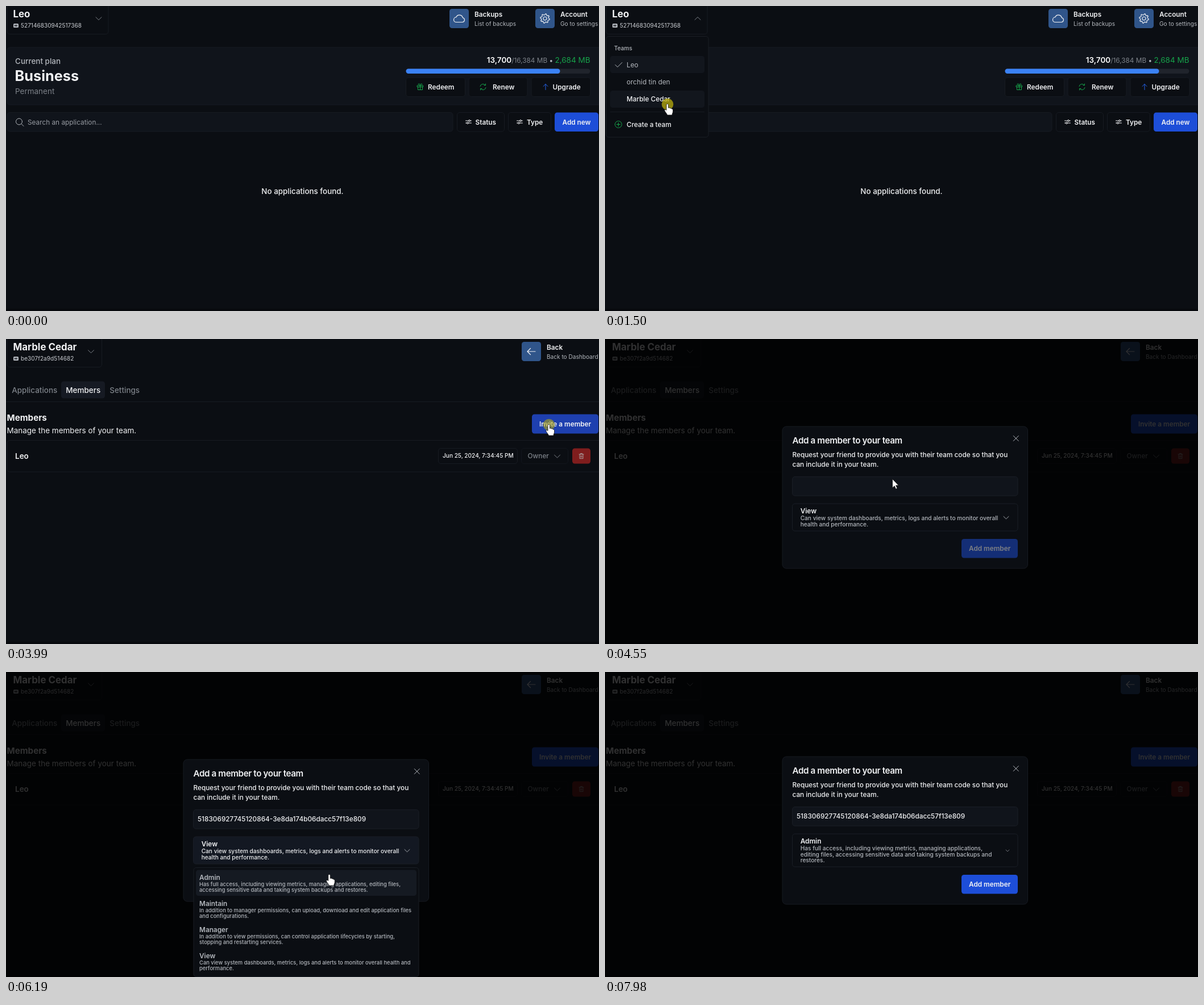
An HTML page for the animation above (8180 ms loop, 1043 px wide and 537 px high).

```html
<!DOCTYPE html>
<html lang="en">
<head>
<meta charset="utf-8">
<title>Inviting a team member</title>
<style>
  html, body { margin: 0; width: 100%; height: 100%; overflow: hidden; background: #0b0e13; }
  svg { display: block; font-family: Inter, "Liberation Sans", sans-serif; }
  text { white-space: pre; }
</style>
</head>
<body>
<svg id="stage" width="1043" height="537" viewBox="0 0 1043 537"></svg>
<script>
const LOOP = 8180;
const BG = '#0b0e13', CARD = '#10141b', LINE = '#171b22', BLUE = '#1d4ed8', TILE = '#30558a';
const WHITE = '#f1f2f4', SOFT = '#b4b8be', GREY = '#7d8289', GREEN = '#16a34a';
const USER = 'Leo', TEAM = 'Marble Cedar';
const CODE = '518306927745120864-3e8da174b06dacc57f13e809';

// Drawing helpers, all returning SVG markup
const text = (x, y, s, size = 11.8, weight = 400, fill = WHITE, more = '') =>
  `<text x="${x}" y="${y}" font-size="${size}" font-weight="${weight}" fill="${fill}" ${more}>${s}</text>`;
const rect = (x, y, w, h, fill = 'none', stroke = 'none', r = 4.5, more = '') =>
  `<rect x="${x}" y="${y}" width="${w}" height="${h}" rx="${r}" fill="${fill}" stroke="${stroke}" ${more}/>`;
const icon = (x, y, d, color = WHITE, scale = 1, more = '') =>
  `<path transform="translate(${x} ${y}) scale(${scale})" d="${d}" fill="none" stroke="${color}" stroke-linecap="round" stroke-linejoin="round" ${more}/>`;
const group = (id, ...parts) => `<g id="${id}">${parts.join('')}</g>`;
const rule = (x, y, w) => rect(x, y, w, 1, LINE, 'none', 0);

const gear = 'M' + Array.from({ length: 32 }, (_, i) => {
  const a = (i + .5) * Math.PI / 16, r = i % 4 < 2 ? 8.2 : 6.3;
  return (r * Math.cos(a)).toFixed(2) + ' ' + (r * Math.sin(a)).toFixed(2);
}).join('L') + 'zM3 0a3 3 0 1 1-6 0 3 3 0 0 1 6 0';
const icons = {
  gear,
  cloud: 'M-5 6.5h10.5a4 4 0 0 0 .8-7.9A6 6 0 0 0-5.2-2.3 4.4 4.4 0 0 0-5 6.5z',
  gift: 'M-5-2.5h10V0h-10zM-4 0v5h8V0M0-2.5V5M0-2.5c-4 0-4-3.5-2-3.2S0-2.5 0-2.5s0-2.9 2-3.2 2 3.2-2 3.2',
  renew: 'M-5-1a5 5 0 0 1 9-2M5 1a5 5 0 0 1-9 2M4.5-5.5V-3H2M-4.5 5.5V3H-2',
  up: 'M0 5V-5M-4-1L0-5 4-1',
  back: 'M7 0H-7M-1.5-5.5L-7 0l5.5 5.5',
  search: 'M3 3l4 4M4.5-1a5.5 5.5 0 1 1-11 0 5.5 5.5 0 0 1 11 0',
  sliders: 'M-5-2h5M3-2h2M-5 2h2M0 2h5M3-2a1.5 1.5 0 1 1-3 0 1.5 1.5 0 0 1 3 0M0 2a1.5 1.5 0 1 1-3 0 1.5 1.5 0 0 1 3 0',
  chevron: 'M-5-2.3L0 2.5 5-2.3',
  check: 'M-6 0l4 4 8-8',
  plus: 'M-6 0a6 6 0 1 0 12 0a6 6 0 1 0-12 0M-3 0h6M0-3v6',
  trash: 'M-4-3h8M-3-3v7.5h6V-3M-1.5-3v-1.5h3V-3M-1-.5v3M1-.5v3',
  close: 'M-4.5-4.5l9 9m0-9l-9 9'
};

const selector = (name, code, w, id) =>
  rect(2, -6, w, 55.5, 'none', LINE) +
  text(12.5, 20.3, name, 16.9, 700) +
  rect(13, 31, 9, 7, SOFT, 'none', 1.5) + icon(17.5, 34.5, 'M-2.5-1v2M-.5-1h2.5v2h-2.5z', BG, .9) +
  text(26, 38, code, 10.1, 400, '#c9ccd1') +
  icon(w - 17, 22, icons.chevron, GREY, 1, `id="${id}"`);

const tile = (x, d, title, note) =>
  rect(x, 5, 34, 34, TILE) + icon(x + 17, 22, icons[d], WHITE, 1, 'stroke-width="1.2"') +
  text(x + 44, 18.7, title, 11.8, 600) + text(x + 44, 34.8, note, 10.1, 400, SOFT);

const button = (x, y, w, d, color, label, gap = 38.5) =>
  rect(x, y, w, 33.5, BG, LINE) + icon(x + (gap > 34 ? 25 : 20), y + 16.5, icons[d], color) +
  text(x + gap, y + 21, label, 11.8, 600);

const tabs = active => [['Applications', 2, 95], ['Members', 97, 77], ['Settings', 174, 70]]
  .map(([s, x, w]) => (s === active ? rect(x, 74.5, w, 30, '#161a23') : '') +
    text(x + 8.2, 94.8, s, 13.5, 500, s === active ? WHITE : GREY)).join('');

const home = group('home',
  selector(USER, '527146830942517368', 178, 'homeChevron'),
  tile(780, 'cloud', 'Backups', 'List of backups'),
  tile(931, 'gear', 'Account', 'Go to settings'),
  rect(2, 73, 1046, 101, CARD, LINE),
  text(16, 102, 'Current plan', 13.5, 500, SOFT),
  text(15.5, 132.3, 'Business', 25.3, 700),
  text(16, 154.5, 'Permanent', 13.5, 400, GREY),
  `<text x="1027.5" y="99.8" text-anchor="end" font-size="11.8" fill="${GREY}"><tspan font-size="13.5" font-weight="600" fill="#fff">13,700</tspan>/16,384 MB<tspan fill="${SOFT}"> • </tspan><tspan font-size="13.5" fill="${GREEN}">2,684 MB</tspan></text>`,
  rect(703.5, 110.5, 324, 8.5, '#20242c', 'none', 4.2),
  rect(703.5, 110.5, 271, 8.5, '#3b82f6', 'none', 4.2),
  button(703.5, 126, 104, 'gift', GREEN, 'Redeem'),
  button(814, 126, 103, 'renew', GREEN, 'Renew', 42),
  button(924, 126, 104, 'up', '#2563eb', 'Upgrade', 37.5));

const apps = group('apps',
  rect(2, 187.5, 784, 33.5, CARD, LINE),
  icon(24, 204.5, icons.search, SOFT),
  text(38, 209.3, 'Search an application...', 11.8, 400, '#969aa1'),
  button(793.5, 187.5, 83, 'sliders', WHITE, 'Status', 32),
  button(883.5, 187.5, 75, 'sliders', WHITE, 'Type', 32.5),
  rect(965, 187.5, 77, 33.5, BLUE),
  text(978.5, 208.7, 'Add new', 11.8, 600),
  text(521.5, 331, 'No applications found.', 13.4, 500, WHITE, 'text-anchor="middle"'));

const teamMenu = group('teamMenu',
  rect(2, 53.5, 180, 177.5, BG, '#1a1e25'),
  text(16, 77.7, 'Teams', 10.1, 500, SOFT),
  rect(9, 88, 166, 30, '#12161d'),
  icon(24, 103.5, icons.check, SOFT),
  text(38, 107.5, USER, 11.8, 400, SOFT),
  text(38, 137.5, 'orchid tin den', 11.8, 400, SOFT),
  group('teamHover', rect(9, 149, 166, 30, '#12161d')),
  text(38, 168, TEAM, 11.8, 500),
  rule(9, 186, 166),
  icon(23.5, 208.5, icons.plus, GREEN),
  text(38, 213, 'Create a team', 11.8, 500));

const team = group('team',
  selector(TEAM, 'be307f2a9d514682', 166.5, 'teamChevron'),
  tile(907, 'back', 'Back', 'Back to Dashboard'),
  rule(0, 110, 1043),
  group('appTabs', tabs('Applications')),
  group('members', tabs('Members'),
    text(1.5, 144, 'Members', 15.2, 700),
    text(1.5, 166.3, 'Manage the members of your team.', 13.5, 400),
    rect(925, 132.5, 117, 34, BLUE, 'none', 4.5, 'id="invite"'),
    text(938, 153.8, 'Invite a member', 11.8, 600),
    rect(2, 178.5, 1046, 55.5, 'none', LINE),
    text(16, 211, USER, 13.5, 600),
    rect(760.5, 192.5, 139, 27, 'none', LINE),
    text(768, 209.3, 'Jun 25, 2024, 7:34:45 PM', 10.1, 500),
    rect(906.5, 192.5, 82, 27, 'none', '#12161d'),
    text(917.5, 210.3, 'Owner', 11.8, 500, GREY),
    icon(969.5, 206.5, icons.chevron, GREY),
    rect(996, 192.5, 32, 27, '#7f1d1d'),
    icon(1012, 206, icons.trash, '#a89a9a')));

const modal = (id, top, role, lines, chevron) => {
  const h = 28 + 10 * lines.length, y = n => top + n;
  return group(id,
    rect(312, top, 431.5, 202 + h, BG, '#161a21', 7),
    text(329.5, y(30), 'Add a member to your team', 15.2, 600, WHITE, 'letter-spacing="-.025em"'),
    icon(722.8, y(21), icons.close, SOFT),
    text(329.5, y(53.8), 'Request your friend to provide you with their team code so that you', 11.8, 500),
    text(329.5, y(70.8), 'can include it in your team.', 11.8, 500),
    rect(329.5, y(88.5), 396.5, 33.5, CARD, '#1a1e26'),
    text(337, y(109.4), CODE, 11.8, 500, WHITE, 'class="filled"'),
    rect(329.5, y(136), 396.5, h, 'none', '#1a1e26', 4.5, `id="${id}Select"`),
    text(343.7, y(153.3), role, 11.8, 600),
    ...lines.map((s, i) => text(343.7, y(165.3 + 10.2 * i), s, 10.15, 500, 'currentColor')),
    icon(chevron ? 705.5 : 708, y(chevron ? 160.5 : 165.5), icons.chevron, SOFT, chevron ? .9 : .6),
    `<g class="submit">${rect(627, y(150 + h), 99, 33.5, BLUE)}${text(640, y(171.2 + h), 'Add member', 11.8, 600)}</g>`);
};

const roles = [
  ['Admin', 'Has full access, including viewing metrics, managing applications, editing files,', 'accessing sensitive data and taking system backups and restores.'],
  ['Maintain', 'In addition to manager permissions, can upload, download and edit application files', 'and configurations.'],
  ['Manager', 'In addition to view permissions, can control application lifecycles by starting,', 'stopping and restarting services.'],
  ['View', 'Can view system dashboards, metrics, logs and alerts to monitor overall health and', 'performance.']
];
const roleMenu = group('roleMenu',
  rect(-198, 0, 396, 192, BG, '#1a1e25'),
  group('roleHover', rect(-194, 4, 388, 45.5, '#151a22')),
  ...roles.map(([name, a, b], i) => {
    const y = 45.9 * i;
    return text(-188, y + 21.3, name, 11.8, 600, SOFT) +
      text(-188, y + 32.8, a, 9.4, 500, SOFT) + text(-188, y + 42.3, b, 9.4, 500, SOFT);
  }));

const pointer = group('pointer',
  '<circle id="ring" r="10.3" fill="#b9ad0c" opacity=".75"/>',
  '<path id="hand" d="M-2 1C-2-1 1.500-1 1.500 1V6.500C2.500 5.500 4.300 6 4.500 7.200 5.500 6.500 7 7 7.200 8.200 8.300 7.800 9.500 8.500 9.500 10V13C9.500 15 8 16 8 19H-.5C-1 16.500-4 14-5 11.500-5.800 9.500-4 8.500-2 10.500Z" fill="#fff" stroke="#111" stroke-width=".8"/>',
  '<path id="arrow" d="M0 0V15.500L3.600 12.200 6 17.600 8.400 16.500 6 11.300H10.800Z" fill="#fff" stroke="#111" stroke-width=".8"/>');

const stage = document.getElementById('stage');
stage.innerHTML = rect(0, 0, 1043, 537, BG, 'none', 0) + home + team + apps + teamMenu +
  rect(0, 533, 1043, 4, '#07090d', 'none', 0) +
  group('dim', rect(0, 0, 1043, 537, '#000', 'none', 0)) +
  group('dialog',
    modal('viewModal', 154, 'View', ['Can view system dashboards, metrics, logs and alerts to monitor overall', 'health and performance.'], true),
    modal('adminModal', 149, 'Admin', ['Has full access, including viewing metrics, managing applications,', 'editing files, accessing sensitive data and taking system backups and', 'restores.'], false)) +
  roleMenu + pointer;

const el = id => document.getElementById(id);
const fade = (id, v) => {
  el(id).style.opacity = v;
  el(id).style.display = v > 0 ? '' : 'none';
};
const place = (id, value) => el(id).setAttribute('transform', value);
const ramp = (t, start, length = 150) => Math.min(1, Math.max(0, (t - start) / length));

// Pointer path: time, x, y, hand shape (1) or arrow (0)
const path = [
  [60, 455, 510, 0], [120, 410, 428, 0], [360, 200, 130, 0], [560, 110, 30, 1], [740, 98, 18, 1],
  [1080, 98, 18, 1], [1400, 110, 168, 1], [1500, 110, 173, 1], [1700, 115, 169, 1],
  [2190, 115, 169, 1], [2440, 147, 97, 1], [2680, 148, 97, 1], [2950, 293, 104, 0],
  [3700, 948, 152, 1], [3990, 955, 151, 1], [4130, 955, 151, 0], [4620, 480, 252, 0],
  [5290, 490, 258, 1], [5560, 572, 306, 1], [5800, 572, 306, 1], [6350, 568, 370, 1],
  [6920, 568, 370, 0], [7680, 960, 500, 0], [7760, 966, 506, 0], [7930, 1000, 540, 0]
];
const clicks = [950, 1450, 2560, 3905, 4640, 5590, 6600];

function movePointer(t) {
  const i = path.findIndex(p => p[0] > t);
  fade('pointer', t >= 120 && i > 0 ? 1 : 0);
  if (i < 1) return;
  const [t0, x0, y0, hand] = path[i - 1], [t1, x1, y1] = path[i];
  const k = (t - t0) / (t1 - t0), e = k * k * (3 - 2 * k);
  place('pointer', `translate(${x0 + (x1 - x0) * e} ${y0 + (y1 - y0) * e})`);
  fade('hand', hand);
  fade('arrow', 1 - hand);
  fade('ring', Math.max(...clicks.map(c => t < c ? 0 : .75 * (1 - ramp(t, c + 60, 110)))));
}

function draw(t) {
  const onTeam = t >= 1860, onMembers = t >= 3010, chosen = t >= 6730;
  fade('home', +!onTeam);
  fade('team', +onTeam);
  fade('apps', +!onMembers);
  place('apps', `translate(0 ${onTeam ? -60 : 0})`);
  fade('appTabs', +!onMembers);
  fade('members', +onMembers);
  el('invite').setAttribute('fill', t > 3650 && t < 4150 ? '#1e40af' : BLUE);

  const open = ramp(t, 1010, 120) * (1 - ramp(t, 1590, 110));
  fade('teamMenu', open);
  fade('teamHover', +(t > 1340));
  place('homeChevron', `translate(161 22) scale(1 ${open > 0 ? -1 : 1}) translate(2 0)`);

  const shown = ramp(t, 4130), zoom = .95 + .05 * shown;
  fade('dim', .8 * shown);
  fade('dialog', shown);
  place('dialog', `translate(528 279) scale(${zoom}) translate(-528 -279)`);
  el('dialog').style.color = t > 5400 && t < 6900 ? WHITE : SOFT;
  fade('viewModal', +!chosen);
  fade('adminModal', +chosen);
  el('viewModalSelect').setAttribute('fill', t > 5450 ? '#131822' : 'none');
  const filled = t >= 4820;
  stage.querySelectorAll('.filled').forEach(n => n.style.opacity = +filled);
  stage.querySelectorAll('.submit').forEach(n => n.style.opacity = filled ? 1 : .5);

  const menu = ramp(t, 5565) * (1 - ramp(t, 6760));
  fade('roleMenu', menu);
  fade('roleHover', +(t > 6150));
  place('roleMenu', `translate(528 ${(chosen ? 350 : 344.5) - 6.7 * (1 - menu)}) scale(${.95 + .05 * menu})`);

  movePointer(t);
}

function tick() {
  draw(performance.now() % LOOP);
  requestAnimationFrame(tick);
}
tick();
</script>
</body>
</html>
```
